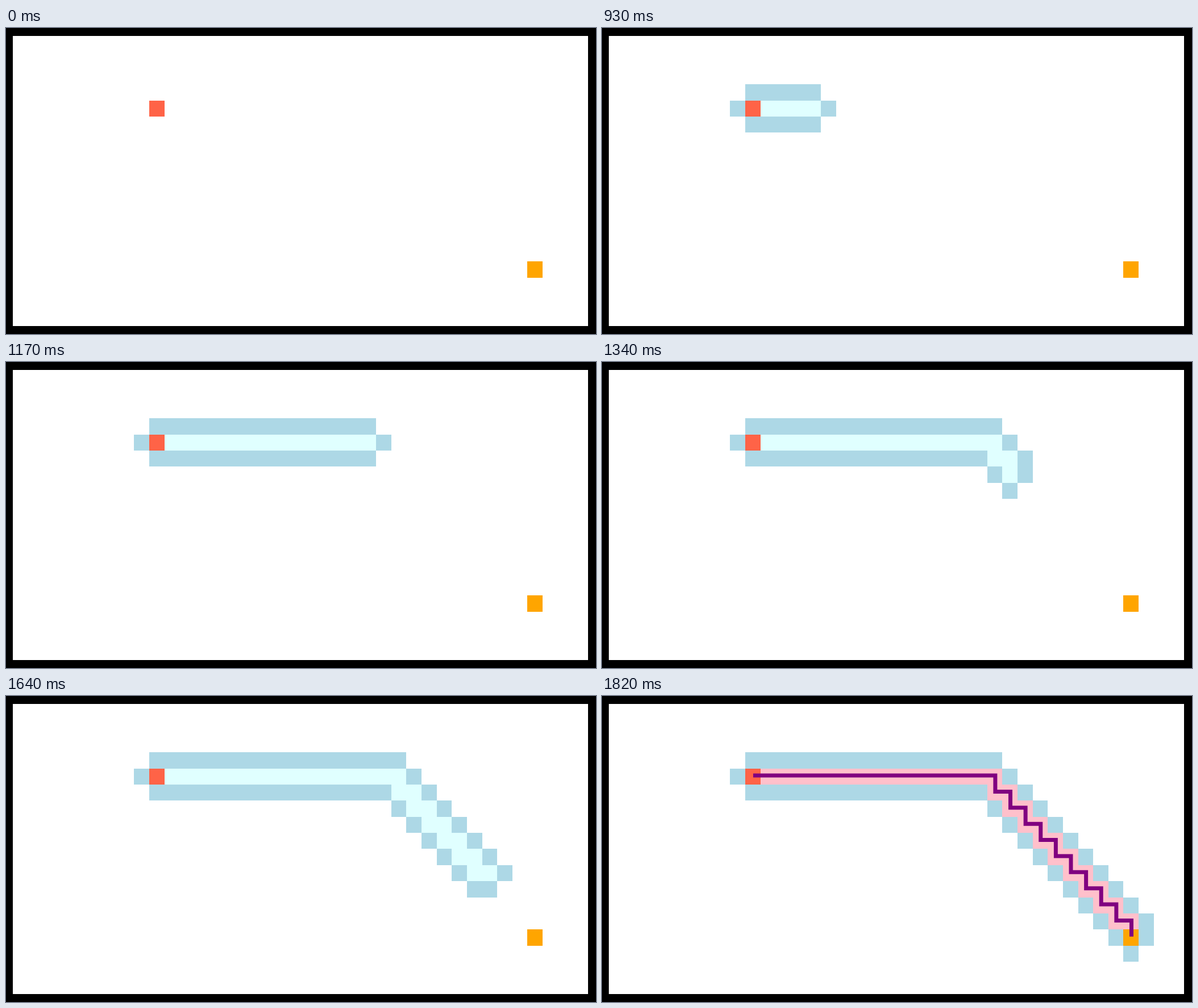
Write an HTML page with a canvas that moves like this. It is 1038 px wide and 539 px high and loops after 2.9 s.

```html
<!DOCTYPE html>
<html lang="en">
<head>
<meta charset="utf-8">
<title>Grid path search</title>
<style>
html, body { margin: 0; width: 100%; height: 100%; overflow: hidden; background: #000; }
canvas { display: block; }
</style>
</head>
<body>
<canvas id="stage" width="1038" height="539"></canvas>
<script>
const ctx = document.getElementById('stage').getContext('2d');
const LOOP = 2900;
const CELL_W = 26.62, CELL_H = 28.38;
const colX = c => Math.round(12.3 + c * CELL_W);
const rowY = r => Math.round(14 + r * CELL_H);

// Straight run to the right, then a staircase of alternating down and right moves
const RUN = 16, LAST = 35;
const path = Array.from({ length: LAST + 1 }, (_, i) => {
  const stair = Math.max(0, i - RUN);
  return [9 + Math.min(i, RUN) + Math.floor(stair / 2), 4 + Math.ceil(stair / 2)];
});

// [time in ms, index of the newest visited cell]
const steps = [
  [770, 1], [870, 4], [940, 6], [1020, 9], [1090, 11], [1170, 14], [1260, 17],
  [1340, 19], [1410, 22], [1500, 25], [1580, 28], [1650, 30], [1730, 33], [1820, LAST]
];

function fillCell([c, r], color) {
  ctx.fillStyle = color;
  ctx.fillRect(colX(c), rowY(r), colX(c + 1) - colX(c), rowY(r + 1) - rowY(r));
}

function drawRoute() {
  ctx.beginPath();
  for (const [c, r] of path) {
    ctx.lineTo(26.4 + c * CELL_W, 26.5 + r * CELL_H);
  }
  ctx.strokeStyle = 'purple';
  ctx.lineWidth = 7;
  ctx.lineJoin = 'miter';
  ctx.stroke();
}

function draw(t) {
  ctx.fillStyle = '#000';
  ctx.fillRect(0, 0, 1038, 539);
  ctx.fillStyle = '#fff';
  ctx.fillRect(12, 14, 1012, 511);

  let head = -1;
  for (const [time, index] of steps) if (t >= time) head = index;
  const done = head === LAST;
  const visited = path.slice(0, head + 1);

  for (const [c, r] of visited) {
    for (const n of [[c - 1, r], [c + 1, r], [c, r - 1], [c, r + 1]]) {
      fillCell(n, 'lightblue');
    }
  }
  for (const cell of visited) fillCell(cell, done ? 'pink' : 'lightcyan');
  fillCell(path[0], 'tomato');
  fillCell(path[LAST], 'orange');
  if (done) drawRoute();
}

const start = performance.now();
function tick() {
  draw((performance.now() - start) % LOOP);
  requestAnimationFrame(tick);
}
tick();
</script>
</body>
</html>
```
